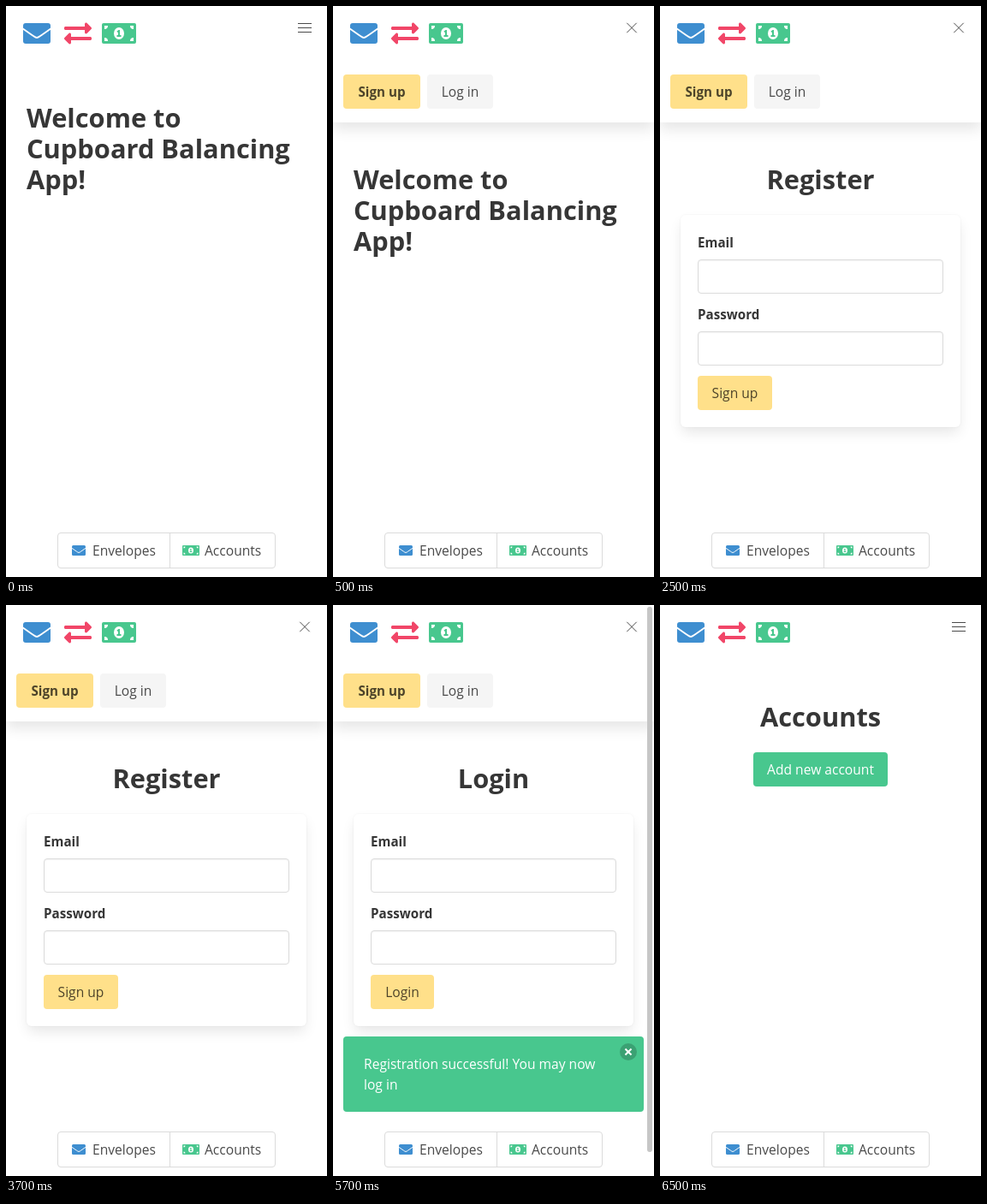
An HTML page for the animation above (8 s loop, 375 px wide and 667 px high).

```html
<!DOCTYPE html>
<html lang="en">
<head>
<meta charset="utf-8">
<title>Cupboard Balancing App</title>
<style>
  html, body { margin: 0; width: 100%; height: 100%; overflow: hidden; background: #fff; }
  body { position: relative; font: 15.6px/24px "Open Sans", "Noto Sans", sans-serif; color: #4a4a4a; }
  div, svg { position: absolute; box-sizing: border-box; white-space: nowrap; }
  svg { left: 0; top: 0; }
  [hidden], svg [hidden] { display: none; }
  .layer { left: 0; top: 0; width: 375px; height: 667px; }
  .title { font-weight: 700; font-size: 30.8px; line-height: 36px; color: #363636; left: 24px; }
  .mid { left: 0; width: 375px; text-align: center; }
  .label { font-weight: 700; font-size: 15.2px; color: #363636; left: 44px; }
  .btn { height: 40px; line-height: 40px; border-radius: 4px; text-align: center; }
  .yellow { background: #ffe08a; color: rgba(0, 0, 0, .7); }
  .grey { background: #f5f5f5; color: rgba(0, 0, 0, .7); }
  .green { background: #48c78e; color: #fff; }
  .menu { left: 0; top: 64px; width: 375px; height: 72px; background: #fff;
    box-shadow: 0 8px 16px rgba(10, 10, 10, .1); clip-path: inset(0 0 -32px); }
  .card { left: 24px; top: 244px; width: 327px; height: 248px; border-radius: 6px; background: #fff;
    box-shadow: 0 8px 16px -2px rgba(10, 10, 10, .1), 0 0 0 1px rgba(10, 10, 10, .02); }
  .input { left: 44px; width: 287px; height: 40px; border: 1px solid #dbdbdb; border-radius: 4px;
    box-shadow: inset 0 1px 2px rgba(10, 10, 10, .05); }
  .note { left: 12px; top: 504px; width: 351px; height: 88px; padding: 20px 24px; border-radius: 4px; }
  .close { left: 335px; top: 512px; width: 20px; height: 20px; border-radius: 50%; background: rgba(10, 10, 10, .2); }
  .close::before, .close::after { content: ""; position: absolute; left: 5px; top: 9px; width: 10px; height: 2px;
    background: #fff; transform: rotate(45deg); }
  .close::after { transform: rotate(-45deg); }
  .scroll { left: 367px; top: 2px; width: 6px; height: 637px; border-radius: 3px; background: #c6c6c6; }
  .tabs { left: 60px; top: 615px; width: 255px; height: 42px; border: 1px solid #dbdbdb; border-radius: 4px; background: #fff; }
  .split { left: 130px; top: 0; width: 1px; height: 40px; background: #dbdbdb; }
</style>
</head>
<body>
  <div class="layer" data-on="welcome menu">
    <div class="title" id="hello">Welcome to<br>Cupboard Balancing<br>App!</div>
  </div>

  <div class="layer" data-on="register login">
    <div class="title mid" style="top:184px" id="head"></div>
    <div class="card"></div>
    <div class="label" style="top:264px">Email</div>
    <div class="input" style="top:296px"></div>
    <div class="label" style="top:348px">Password</div>
    <div class="input" style="top:380px"></div>
    <div class="btn yellow" style="left:44px;top:432px" id="send"></div>
  </div>

  <div class="layer" data-on="accounts">
    <div class="title mid" style="top:112px">Accounts</div>
    <div class="btn green" style="left:109px;top:172px;width:157px">Add new account</div>
  </div>

  <div class="layer" data-on="menu register login">
    <div class="menu"></div>
    <div class="btn yellow" style="left:12px;top:80px;width:90px;font-weight:700;font-size:15.2px">Sign up</div>
    <div class="btn grey" style="left:110px;top:80px;width:77px">Log in</div>
  </div>

  <div class="layer" data-on="login">
    <div class="note green">Registration successful! You may now<br>log in</div>
    <div class="close"></div>
  </div>

  <div class="tabs">
    <div class="split"></div>
    <div style="left:40px;top:8px">Envelopes</div>
    <div style="left:171px;top:8px">Accounts</div>
  </div>

  <svg width="375" height="667">
    <defs>
      <g id="mail">
        <rect width="32" height="24" rx="3" fill="#3e8ed0"/>
        <path d="M-1 6 10.8 14.2C13 15.7 14.5 17 16 17S19 15.7 21.2 14.2L33 6" fill="none" stroke="#fff" stroke-width="1.9"/>
      </g>
      <path id="arrow" fill="#f14668" d="M0 10.5v-1C0 8.7.7 8 1.5 8H24V5c0-1.3 1.6-2 2.6-1.1l5 5c.6.6.6 1.5 0 2.1l-5 5C25.6 17 24 16.3 24 15v-3H1.5C.7 12 0 11.3 0 10.5z"/>
      <path id="corner" d="M3 3h4a4 4 0 0 1-4 4z" fill="#fff"/>
      <g id="bill">
        <rect width="40" height="24" rx="2" fill="#48c78e"/>
        <use href="#corner"/>
        <use href="#corner" transform="matrix(-1 0 0 1 40 0)"/>
        <use href="#corner" transform="matrix(1 0 0 -1 0 24)"/>
        <use href="#corner" transform="matrix(-1 0 0 -1 40 24)"/>
        <ellipse cx="20" cy="12" rx="6" ry="7" fill="#fff"/>
        <path d="M17.5 9.6 19.5 8H21v6h1.5v2h-5v-2H19v-3.6l-.8.5z" fill="#48c78e"/>
      </g>
    </defs>
    <use href="#mail" x="20" y="20"/>
    <use href="#arrow" x="68" y="16"/>
    <use href="#arrow" transform="rotate(180 84 32) translate(68 16)"/>
    <use href="#bill" x="112" y="20"/>
    <use href="#mail" transform="translate(77 630) scale(.5)"/>
    <use href="#bill" transform="translate(206 630) scale(.5)"/>
    <g stroke="#4a4a4a" fill="none">
      <path data-on="welcome accounts" d="M341 20.5h16M341 25.5h16M341 30.5h16"/>
      <path data-on="menu register login" d="M343.3 19.8l11.4 11.4M343.3 31.2l11.4-11.4"/>
    </g>
  </svg>

  <div class="scroll" data-on="login"></div>

<script>
  const LOOP = 8000;
  const steps = [
    [0, "welcome"],
    [500, "menu"],
    [2500, "register"],
    [4500, "login"],
    [6500, "accounts"],
  ];
  const byId = id => document.getElementById(id);
  const parts = [...document.querySelectorAll("[data-on]")];
  let current = "";

  function show(scene) {
    if (scene === current) return;
    current = scene;
    for (const part of parts) {
      part.toggleAttribute("hidden", !part.dataset.on.split(" ").includes(scene));
    }
    const login = scene === "login";
    byId("hello").style.top = scene === "welcome" ? "112px" : "184px";
    byId("head").textContent = login ? "Login" : "Register";
    byId("send").textContent = login ? "Login" : "Sign up";
    byId("send").style.width = login ? "74px" : "87px";
  }

  const start = performance.now();
  function tick() {
    const t = (performance.now() - start) % LOOP;
    show(steps.filter(([at]) => at <= t).pop()[1]);
    requestAnimationFrame(tick);
  }
  tick();
</script>
</body>
</html>
```
